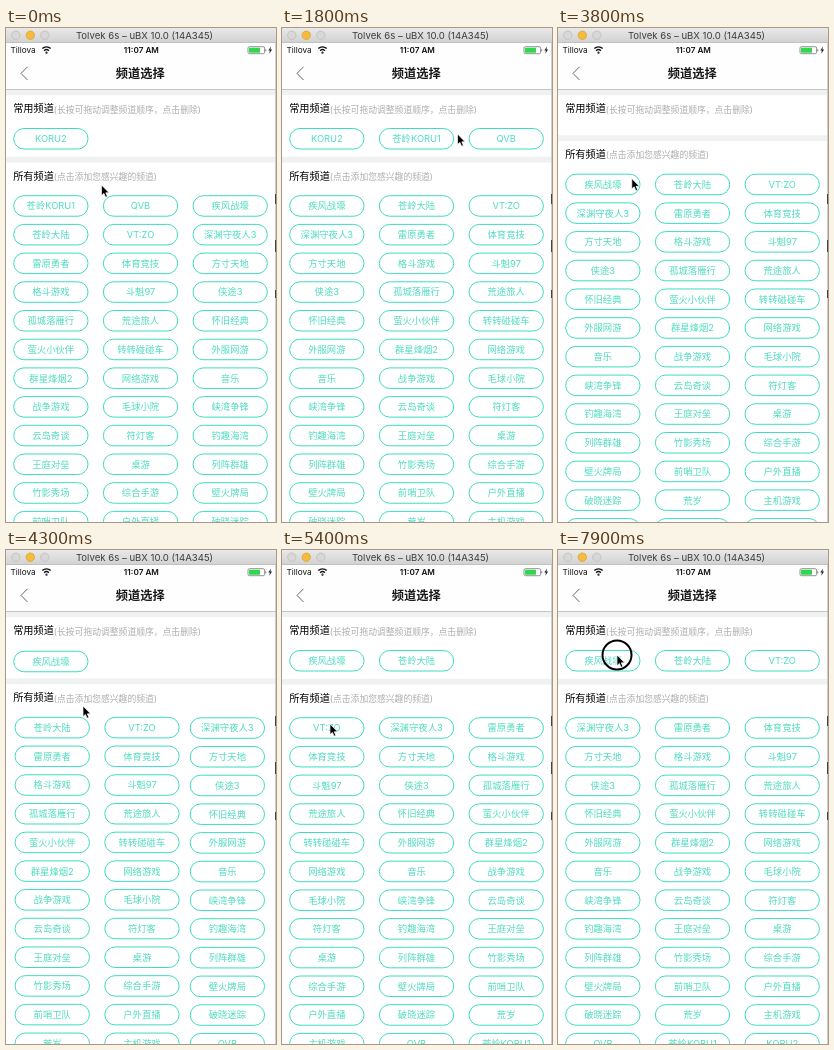
Write an HTML page that moves like this. It is 270 by 494 pixels and loops after 8000 ms.

```html
<!DOCTYPE html>
<html lang="zh-CN">
<head>
<meta charset="utf-8">
<title>频道选择</title>
<style>
  html, body { margin: 0; width: 100%; height: 100%; overflow: hidden; background: #fff; }
  svg { display: block; width: 100vw; height: 100vh; }
  text { font-family: Inter, "Noto Sans CJK SC", "Noto Sans CJK", sans-serif; }
  .pill rect { fill: #fff; stroke: #3edcc1; stroke-width: 1; }
  .pill text { font-size: 9.36px; fill: #4fdcc1; text-anchor: middle; }
  .head { font-size: 10.2px; font-weight: 500; fill: #000; }
  .hint { font-size: 8.8px; fill: #adadad; }
  .status { font-size: 8.2px; fill: #111; }
</style>
</head>
<body>
<svg viewBox="0 0 270 494" xmlns="http://www.w3.org/2000/svg">
  <defs>
    <linearGradient id="bar" x2="0" y2="1">
      <stop offset="0" stop-color="#e9e9e9"/>
      <stop offset="1" stop-color="#d2d2d2"/>
    </linearGradient>
  </defs>
  <rect width="270" height="494" fill="#fff"/>

  <g>
    <rect y="61.4" width="270" height="5.8" fill="#f0f1f1"/>
    <text class="head" x="7.2" y="84.4">常用频道</text>
    <text class="hint" x="47.8" y="84.5">(长按可拖动调整频道顺序，点击删除)</text>
  </g>
  <g id="second">
    <rect width="270" height="5.8" fill="#f0f1f1"/>
    <text class="head" x="7.2" y="23">所有频道</text>
    <text class="hint" x="47.8" y="23.1">(点击添加您感兴趣的频道)</text>
  </g>
  <g id="pills"></g>

  <rect y="14" width="270" height="47" fill="#fefefe"/>
  <rect y="61" width="270" height="0.8" fill="#b8b8b8"/>
  <text class="status" x="4.5" y="25.2">Tillova</text>
  <g fill="none" stroke="#111" stroke-width="1.4">
    <path d="M36.3 20.6a6 6 0 0 1 8.4 0M38.1 22.7a3.5 3.5 0 0 1 4.8 0"/>
    <circle cx="40.5" cy="24.7" r="0.4"/>
  </g>
  <text class="status" x="135.4" y="25.2" text-anchor="middle" font-weight="600">11:07 AM</text>
  <rect x="242" y="18.7" width="16.6" height="7" rx="1.4" fill="#fff" stroke="#666" stroke-width="0.7"/>
  <rect x="243" y="19.7" width="11" height="5" rx="0.6" fill="#2fd74f"/>
  <path d="M259.4 21v2.4q1-.3 1-1.2t-1-1.2z" fill="#666"/>
  <path d="M265 18.6l-2.7 4h1.6l-.6 3.2 2.8-4.2h-1.7z" fill="#222"/>

  <path d="M21.5 38.8L15 45.4l6.5 6.6" fill="none" stroke="#666" stroke-width="1"/>
  <text x="134.3" y="49.8" font-size="12.24" font-weight="700" fill="#1a1a1a" text-anchor="middle">频道选择</text>

  <rect width="270" height="14.2" fill="url(#bar)"/>
  <rect y="14" width="270" height="0.7" fill="#adadad"/>
  <g stroke-width="0.7">
    <circle cx="9.8" cy="7.2" r="4.2" fill="#dad7d7" stroke="#bdb9b9"/>
    <circle cx="24.3" cy="7.2" r="4.2" fill="#f6bb3c" stroke="#d99f2c"/>
    <circle cx="38.8" cy="7.2" r="4.2" fill="#d7d7d7" stroke="#bababa"/>
  </g>
  <text x="138.5" y="10.6" font-size="9.6" fill="#3c3c3c" text-anchor="middle">Tolvek 6s – uBX 10.0 (14A345)</text>
  <rect x="269.2" y="14" width="0.8" height="480" fill="#c4c4c4"/>
  <path d="M269.5 166v10M269.5 212v12M269.5 262v8" stroke="#444"/>

  <g id="cursor">
    <circle id="ring" r="14.5" fill="none" stroke="#000" stroke-width="2"/>
    <path d="M0 0V10.6L2.4 8.4 4.1 12.2 5.9 11.4 4.3 7.8H7.6Z" fill="#000" stroke="#fff" stroke-width="0.7"/>
  </g>
</svg>

<script>
const LOOP = 8000, STEP = 100, MOVE = 300, PRESS = 120;

// Phone points to stage pixels
const PT = 0.7175;
const ITEM_H = 30 * PT, ITEM_W = 105 * PT, ROW = 40 * PT, COL = 125 * PT, LEFT = 10 * PT;
const TOP_Y = 100, HEAD_Y = 128.8, HEAD_TO_ITEMS = 38.4;

const CHANNELS = ('苍岭KORU1 QVB 疾风战壕 苍岭大陆 VT:ZO 深渊守夜人3 雷原勇者 体育竞技 方寸天地 ' +
  '格斗游戏 斗魁97 侠途3 孤城落雁行 荒途旅人 怀旧经典 萤火小伙伴 转转碰碰车 外服网游 ' +
  '群星烽烟2 网络游戏 音乐 战争游戏 毛球小院 峡湾争锋 云岛奇谈 符灯客 钓趣海湾 ' +
  '王庭对垒 桌游 列阵群雄 竹影秀场 综合手游 壁火牌局 前哨卫队 户外直播 破晓迷踪 ' +
  '荒岁 主机游戏').split(' ');

// Each tap moves a channel to the end of the other section.
const TAPS = [
  [280, '苍岭KORU1'], [1080, 'QVB'], [2180, 'QVB'], [2720, '苍岭KORU1'],
  [3283, 'KORU2'], [4027, '疾风战壕'], [4850, '苍岭大陆'], [5650, 'VT:ZO']
];
const HOLD_FROM = 7400;

// time, x, y of the pointer tip
const PATH = [
  [0, 95.5, 157], [200, 56, 178], [400, 55, 180], [700, 53.5, 190], [900, 50, 178],
  [1300, 50, 178], [1800, 175.5, 106], [2000, 211, 108], [2350, 211, 108],
  [2600, 136, 110], [2850, 134, 110], [3200, 52, 113], [3500, 52, 113],
  [3900, 77, 156], [4300, 77, 156], [4700, 48, 174], [6000, 48, 174],
  [6800, 59, 105], [LOOP, 59, 105]
];

const $ = id => document.getElementById(id);
const mix = (a, b, p) => a + (b - a) * p;
const place = (el, x, y) => el.setAttribute('transform', `translate(${x.toFixed(2)} ${y.toFixed(2)})`);

function make(tag, attrs, parent) {
  const el = document.createElementNS('http://www.w3.org/2000/svg', tag);
  for (const k in attrs) el.setAttribute(k, attrs[k]);
  return parent.appendChild(el);
}

function makePill(name) {
  const g = make('g', { class: 'pill' }, $('pills'));
  make('rect', { x: 0.5, y: 0.5, width: ITEM_W - 1, height: ITEM_H - 1, rx: ITEM_H / 2 - 0.5 }, g);
  make('text', { x: ITEM_W / 2, y: 14.2 }, g).textContent = name;
  return g;
}

// An empty first section gives up its row, which lifts the second one.
function layout(mine, rest) {
  const headY = HEAD_Y - (mine.length ? 0 : ITEM_H);
  const spots = {};
  const fill = (list, top) => list.forEach((name, i) => {
    spots[name] = [LEFT + COL * (i % 3), top + ROW * Math.floor(i / 3)];
  });
  fill(mine, TOP_Y);
  fill(rest, headY + HEAD_TO_ITEMS);
  return { headY, spots };
}

function buildLayouts() {
  let mine = ['KORU2'], rest = CHANNELS;
  const out = [layout(mine, rest)];
  for (const [, name] of TAPS) {
    const without = list => list.filter(n => n !== name);
    [mine, rest] = mine.includes(name)
      ? [without(mine), [...rest, name]]
      : [[...mine, name], without(rest)];
    out.push(layout(mine, rest));
  }
  return out;
}

// cubic-bezier(.42, 0, .58, 1)
function ease(x) {
  if (x <= 0 || x >= 1) return Math.min(1, Math.max(0, x));
  let lo = 0, hi = 1, u = 0.5;
  for (let i = 0; i < 24; i++) {
    u = (lo + hi) / 2;
    const v = 1 - u;
    if (1.26 * v * v * u + 1.74 * v * u * u + u * u * u < x) lo = u; else hi = u;
  }
  return u * u * (3 - 2 * u);
}

const layouts = buildLayouts();
const pills = {};
['KORU2', ...CHANNELS].forEach(name => { pills[name] = makePill(name); });
let shown = -1;

function drawPills(t) {
  const done = TAPS.filter(([at]) => at <= t).length;
  const to = layouts[done], from = layouts[Math.max(0, done - 1)];
  const p = done ? ease((t - TAPS[done - 1][0]) / MOVE) : 1;
  if (done !== shown) {
    shown = done;
    if (done) $('pills').appendChild(pills[TAPS[done - 1][1]]);
  }
  for (const name in pills) {
    const a = from.spots[name], b = to.spots[name];
    place(pills[name], mix(a[0], b[0], p), mix(a[1], b[1], p));
  }
  place($('second'), 0, mix(from.headY, to.headY, p));
}

function drawCursor(t) {
  const i = PATH.findIndex(k => k[0] > t);
  const a = PATH[i - 1], b = PATH[i];
  const p = ease((t - a[0]) / (b[0] - a[0]));
  place($('cursor'), mix(a[1], b[1], p), mix(a[2], b[2], p));
  const down = t >= HOLD_FROM || TAPS.some(([at]) => t < at && t >= at - PRESS);
  $('ring').setAttribute('visibility', down ? 'visible' : 'hidden');
}

function draw(ms) {
  const t = Math.floor(((ms + 8) % LOOP) / STEP) * STEP;
  drawPills(t);
  drawCursor(t);
}

const start = performance.now();
function tick() {
  draw(performance.now() - start);
  requestAnimationFrame(tick);
}
draw(0);
requestAnimationFrame(tick);
</script>
</body>
</html>
```
